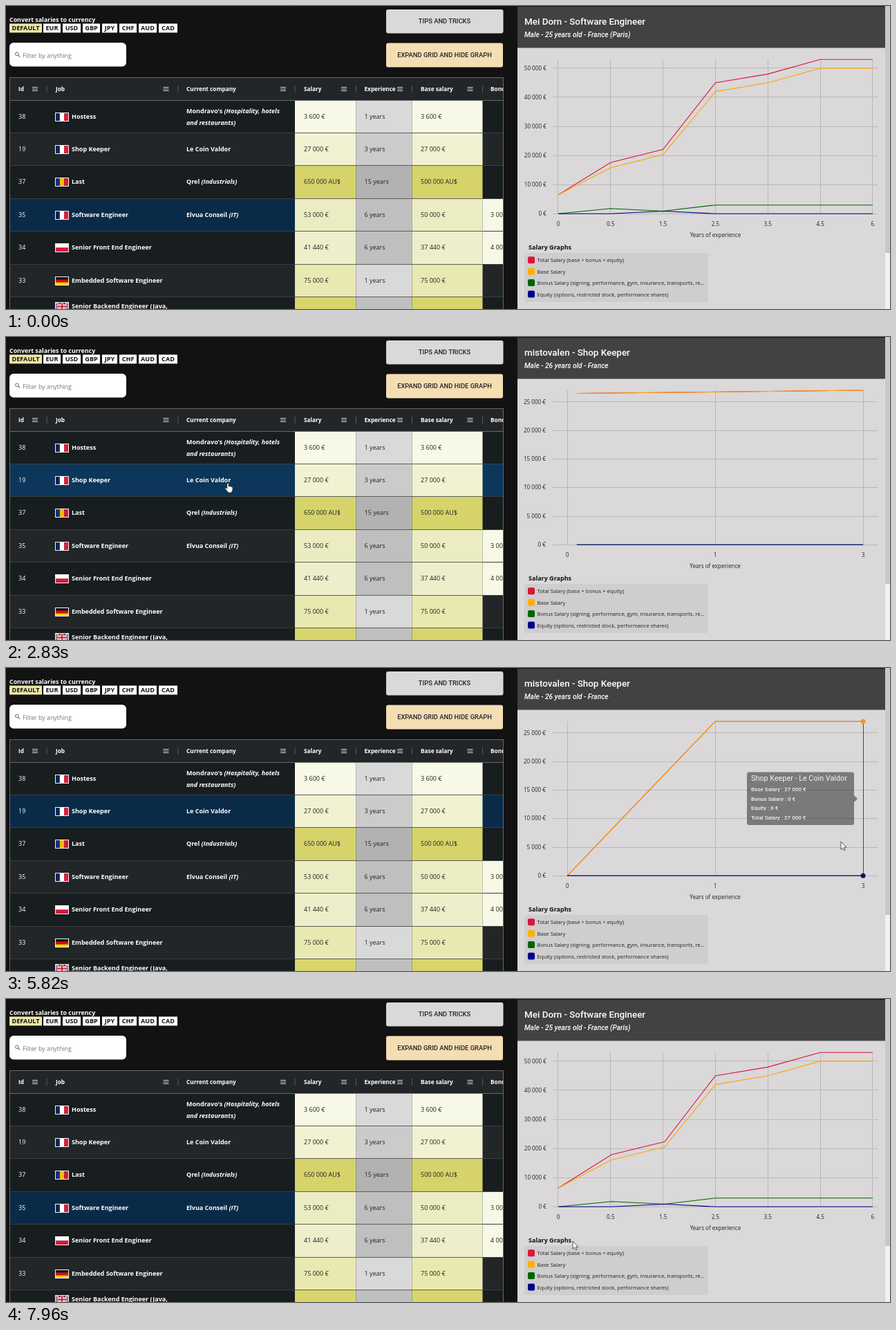
Animation, 1279 px wide and 438 px high, one loop 7.99 s. Source, as an HTML page:

```html
<!DOCTYPE html>
<html lang="en">
<head>
<meta charset="utf-8">
<title>Salary grid</title>
<style>
html, body { margin: 0; width: 100%; height: 100%; overflow: hidden; background: #121212; }
svg { display: block; width: 100vw; height: 100vh; }
text { font: 9px "Open Sans", "Noto Sans", sans-serif; fill: #222; white-space: pre; }
.bold { font-weight: 700; }
.light { fill: #fff; }
.head { font-size: 8.25px; font-weight: 700; fill: #fff; }
.axis { font-size: 8.1px; }
.legend { font-size: 7.67px; }
.button { font: 500 9.4px Roboto, sans-serif; }
.title { font: 500 13.4px Roboto, sans-serif; fill: #fff; }
.sub { font: italic 500 10.15px Roboto, sans-serif; fill: #fff; }
.tip { font: 500 8px Roboto, sans-serif; fill: #f4f4f4; }
.tipTitle { font: 400 10.8px Roboto, sans-serif; fill: #f4f4f4; }
</style>
</head>
<body>
<svg id="stage" viewBox="0 0 1279 438" xmlns="http://www.w3.org/2000/svg"></svg>
<script>
const LOOP = 7990, MORPH = 750;
const ROW_TOP = 136, ROW_H = 47.4, BASE_Y = 300.3, PLOT_H = 223, PLOT_RIGHT = 1261.5;
const COLORS = ['#dc143c', '#ffa500', '#006400', '#00008b'];
const SHOP = 'Le Coin Valdor';

const rect = (x, y, w, h, fill, extra = '') =>
  `<rect x="${x}" y="${y}" width="${w}" height="${h}" fill="${fill}" ${extra}/>`;
const text = (x, y, str, cls = '', extra = '') =>
  `<text x="${x}" y="${y}" class="${cls}" ${extra}>${str}</text>`;
const path = (d, stroke, width = 1, extra = '') =>
  `<path d="${d}" fill="none" stroke="${stroke}" stroke-width="${width}" ${extra}/>`;
const MIDDLE = 'text-anchor="middle"', END = 'text-anchor="end"';
const italic = str => `<tspan font-style="italic">${str}</tspan>`;
const crisp = v => Math.floor(v) + 0.5;

const rows = [
  { id: 38, flag: 'fr', job: 'Hostess', firm: ['Mondravo\'s ' + italic('(Hospitality, hotels'), italic('and restaurants)')],
    pay: '3 600 €', years: 1, base: '3 600 €', fill: '#f7f8e6', grey: '#d9d9d9' },
  { id: 19, flag: 'fr', job: 'Shop Keeper', firm: [SHOP],
    pay: '27 000 €', years: 3, base: '27 000 €', fill: '#f2f1d2', grey: '#cbcbcb' },
  { id: 37, flag: 'ro', job: 'Last', firm: ['Qrel ' + italic('(Industrials)')],
    pay: '650 000 AU$', years: 15, base: '500 000 AU$', fill: '#d5d36a', grey: '#b2b2b2' },
  { id: 35, flag: 'fr', job: 'Software Engineer', firm: ['Elvua Conseil ' + italic('(IT)')],
    pay: '53 000 €', years: 6, base: '50 000 €', bonus: '3 000 €', fill: '#ececc2', grey: '#bfbfbf' },
  { id: 34, flag: 'pl', job: 'Senior Front End Engineer', firm: [],
    pay: '41 440 €', years: 6, base: '37 440 €', bonus: '4 000 €', fill: '#efeecb', grey: '#bfbfbf' },
  { id: 33, flag: 'de', job: 'Embedded Software Engineer', firm: [],
    pay: '75 000 €', years: 1, base: '75 000 €', fill: '#e8e8b1', grey: '#d9d9d9' },
  { flag: 'uk', job: 'Senior Backend Engineer (Java,', firm: [], fill: '#d7d56c', grey: '#bfbfbf', tall: true }
];
const rowY = i => Math.floor(ROW_TOP + ROW_H * i);

const charts = {
  engineer: {
    row: 3, title: 'Mei Dorn - Software Engineer', sub: 'Male - 25 years old - France (Paris)',
    max: 53000, tick: 10000, left: 791.4, ticks: [0, 0.5, 1.5, 2.5, 3.5, 4.5, 6],
    series: [[6500, 17600, 22100, 45000, 48000, 53000, 53000], [6500, 15800, 20300, 42000, 45000, 50000, 50000],
      [0, 1800, 900, 3000, 3000, 3000, 3000], [0, 0, 900, 0, 0, 0, 0]]
  },
  hostess: {
    row: 0, title: 'Velra - Hostess', sub: 'Female - 21 years old - France (Paris) - Bachelor\'s Degree',
    max: 3600, tick: 500, left: 786.4, ticks: [0, 1],
    series: [[3600, 3600], [3600, 3600], [0, 0], [0, 0]]
  },
  shop: {
    row: 1, title: 'mistovalen - Shop Keeper', sub: 'Male - 26 years old - France',
    max: 27000, tick: 5000, left: 790.6, ticks: [0, 1, 3],
    series: [[0, 27000, 27000], [0, 27000, 27000], [0, 0, 0], [0, 0, 0]]
  }
};
const schedule = [[-MORPH, charts.engineer], [1535, charts.hostess], [2806, charts.shop], [7300, charts.engineer]];

// time, x, y of the pointer tip
const pointerPath = [
  [320, 412, -12.3], [640, 305, 90], [780, 266, 135], [930, 324, 174], [2360, 324, 174], [2620, 321, 211],
  [3180, 321, 211], [3480, 592, 235], [3780, 785, 256], [3980, 785, 256], [4180, 832.5, 262],
  [4420, 905, 264], [4580, 905, 264], [5110, 1000, 262], [5370, 1000, 262], [5820, 1208, 251],
  [6060, 1216, 250], [6460, 1216, 250], [6810, 453, 298], [7400, 453, 298], [7900, 820, 350]
];
// start time, active point, left edge of the tooltip
const tips = [[4060, 0, 828], [4640, 1, 1042], [5620, 2, 1072]], TIP_END = 6560;

const lerp = (a, b, k) => a + (b - a) * k;
const clamp = k => Math.max(0, Math.min(1, k));
const smooth = k => k * k * (3 - 2 * k);
const grouped = n => String(n).replace(/\B(?=(\d{3})+$)/g, ' ');

// cubic-bezier(.25, .1, .25, 1)
function ease(x) {
  x = clamp(x);
  let lo = 0, hi = 1;
  const curve = (s, a, b) => 3 * s * (1 - s) ** 2 * a + 3 * s * s * (1 - s) * b + s ** 3;
  for (let i = 0; i < 22; i++) {
    const mid = (lo + hi) / 2;
    if (curve(mid, 0.25, 0.25) < x) lo = mid; else hi = mid;
  }
  return curve(lo, 0.1, 1);
}

function pointX(chart, i) {
  const step = (PLOT_RIGHT - chart.left) / (chart.ticks.length - 0.8);
  return chart.left + step * (0.1 + i);
}
const valueY = (chart, v) => BASE_Y - PLOT_H * v / chart.max;

function flag(kind, y) {
  const x = 71.5, w = 19, h = 12;
  const bands = {
    fr: ['#0a2458', '#fff', '#dc1f38'], ro: ['#10307c', '#fbb800', '#d01c30'],
    pl: ['#fff', '#dc143c'], de: ['#111', '#dd0a0a', '#ffce00']
  }[kind];
  let out = '';
  if (kind === 'uk') {
    const cross = `M${x + w / 2} ${y}v${h}M${x} ${y + 6}h${w}`, diag = `M${x} ${y}l${w} ${h}M${x + w} ${y}l${-w} ${h}`;
    out = rect(x, y, w, h, '#1b2c6b') + path(diag, '#fff', 2.6) + path(diag, '#d01c30', 0.9) +
      path(cross, '#fff', 4) + path(cross, '#d01c30', 2.2);
  } else {
    const n = bands.length, upright = kind === 'fr' || kind === 'ro';
    bands.forEach((c, i) => {
      out += upright ? rect(x + i * w / n, y, w / n, h, c) : rect(x, y + i * h / n, w, h / n, c);
    });
  }
  return out + rect(x, y, w, h, 'none', 'stroke="#f4f4f4"');
}

function toolbar() {
  const chips = [['DEFAULT', 5, 47], ['EUR', 54, 25], ['USD', 82, 26], ['GBP', 111, 25],
    ['JPY', 139, 22], ['CHF', 164, 25], ['AUD', 192, 26], ['CAD', 221, 27]];
  return text(5, 23, 'Convert salaries to currency', 'bold light', 'style="font-size:8.85px"') +
    chips.map(([label, x, w], i) => rect(x, 25.5, w, 13, i ? '#fff' : '#ede7a9') +
      text(x + w / 2, 35.3, label, 'bold', MIDDLE + ' style="fill:#111;font-size:9.1px"')).join('') +
    rect(5, 53, 169, 34.5, '#fff', 'rx="6"') +
    '<circle cx="15.8" cy="69.3" r="2.3" fill="none" stroke="#666"/>' + path('M17.6 71.1l2.6 2.6', '#666', 1.2) +
    text(24, 74.6, 'Filter by anything', '', 'style="fill:#757575;font-size:8.85px"') +
    rect(550, 5, 169.5, 34.5, '#d9d9d9', 'rx="3"') + text(634.5, 25, 'TIPS AND TRICKS', 'button', MIDDLE) +
    rect(550, 53.5, 169, 35, '#f5deb3', 'rx="3"') + text(634.5, 74, 'EXPAND GRID AND HIDE GRAPH', 'button', MIDDLE);
}

function gridHeader() {
  const labels = [['Id', 18], ['Job', 72], ['Current company', 261], ['Salary', 431],
    ['Experience', 518.5], ['Base salary', 600], ['Bonus', 701]];
  return rect(5, 103, 715, 33, '#222628') +
    labels.map(([s, x]) => text(x, 123, s, 'head')).join('') +
    [42, 231.5, 401, 489, 570, 671.5].map(x => path(`M${x - 4} 117.5h8m-8 2.5h8m-8 2.5h8`, '#e8e8e8', 0.9)).join('') +
    [59, 249, 418, 506.5, 587.5, 689.5].map(x => path(`M${x} 115v10`, '#565b5e')).join('');
}

function gridCells() {
  return rows.map((r, i) => {
    const y = rowY(i), mid = y + 27.4, h = rowY(i + 1) - y, line = y + 0.5;
    let out = rect(418, y, 88.5, h, r.fill) + rect(506.5, y, 81, h, r.grey) + rect(587.5, y, 102, h, r.fill);
    if (r.bonus) out += rect(689.5, y, 40, h, '#f7f8e6') + text(701, mid, r.bonus);
    if (i) out += path(`M5 ${line}H418M689.5 ${line}H720`, '#3a3f41') + path(`M418 ${line}H689.5`, '#5c5e58');
    out += flag(r.flag, r.tall ? y + 8.5 : y + 18.5) + text(95, r.tall ? y + 16.6 : mid, r.job, 'bold light');
    if (r.tall) return out;
    const firmY = r.firm.length > 1 ? y + 19.3 : mid;
    return out + text(18, mid, r.id, 'light') +
      r.firm.map((s, k) => text(261, firmY + 16.7 * k, s, 'bold light')).join('') +
      text(431, mid, r.pay) + text(518.5, mid, r.years + ' years') + text(600, mid, r.base);
  }).join('');
}

function panel() {
  const legend = ['Total Salary (base + bonus + equity)', 'Base Salary',
    'Bonus Salary (signing, performance, gym, insurance, transports, re...',
    'Equity (options, restricted stock, performance shares)'];
  const swatches = ['#dc143c', '#ffb000', '#006400', '#00008b'];
  return rect(740, 1, 532, 437, '#dad8d9') + rect(740, 1, 532, 59.5, '#434241') +
    rect(1272, 0, 7, 438, '#f1f1f1') + rect(1272, 0, 7, 357, '#c8c8c8') +
    text(756, 351.5, 'Salary Graphs', 'bold', 'style="fill:#111"') + rect(750, 357, 266, 71, '#cfcdce', 'rx="3"') +
    legend.map((s, i) => rect(755, 362.3 + 16.4 * i, 10, 10, swatches[i], 'rx="2"') +
      text(768.5, 370.3 + 16.4 * i, s, 'legend')).join('');
}

function axes(chart) {
  let out = text(750, 26.5, chart.title, 'title') + text(750, 44.5, chart.sub, 'sub');
  for (let v = 0; v <= chart.max; v += chart.tick) {
    const y = valueY(chart, v);
    out += path(`M${chart.left} ${crisp(y)}H${PLOT_RIGHT}`, '#b9b7b8') +
      text(chart.left - 9.5, y + 2.7, grouped(v) + ' €', 'axis', END);
  }
  chart.ticks.forEach((label, i) => {
    const x = pointX(chart, i);
    out += path(`M${crisp(x)} 77V300`, '#b9b7b8') + text(x, 317.5, label, 'axis', MIDDLE);
  });
  return out + text((chart.left + PLOT_RIGHT) / 2, 334, 'Years of experience', 'axis', MIDDLE);
}

function lines(chart, before, k) {
  return chart.series.map((values, s) => {
    const d = values.map((v, i) => {
      const x = pointX(chart, i), y = valueY(chart, v);
      const old = before?.series[s][i];
      if (old === undefined) return `${x} ${y}`;
      return `${lerp(pointX(before, i), x, k)} ${lerp(valueY(before, old), y, k)}`;
    }).join('L');
    return path('M' + d, COLORS[s], 1.1);
  }).join('');
}

function tooltip(t) {
  if (t < tips[0][0] || t >= TIP_END) return '';
  const n = tips.filter(tip => tip[0] <= t).length - 1;
  const [start, i, goal] = tips[n];
  const left = n ? lerp(tips[n - 1][2], goal, ease((t - start) / 200)) : goal;
  const shown = clamp((t - tips[0][0]) / 220) * clamp((TIP_END - t) / 60);
  const chart = charts.shop, x = pointX(chart, i), value = chart.series[0][i];
  const top = i ? 150.5 : 161, width = i ? 155 : 70, height = i ? 76.5 : 55.5, first = i ? 178 : 170;
  const unit = i ? ' €' : '';
  const edge = i === 2 ? left + width : left, nose = i === 2 ? 5 : -5;
  let out = path(`M${crisp(x)} 77V300`, '#4a4a3c', 1, `opacity="${shown}"`);
  if (i) out += `<circle cx="${x}" cy="${valueY(chart, value)}" r="3.5" fill="#f39a1e"/>`;
  out += `<circle cx="${x}" cy="${BASE_Y}" r="3.5" fill="#14145c"/>`;
  out += `<g opacity="${shown}"><g fill="#000" opacity=".43">` +
    rect(left, top, width, height, '#000', 'rx="3"') + `<path d="M${edge} 184l${nose} 5l${-nose} 5z"/></g>`;
  if (i) out += text(left + 6, 163, 'Shop Keeper - ' + SHOP, 'tipTitle');
  [['Base Salary', value], ['Bonus Salary', 0], ['Equity', 0], ['Total Salary', value]].forEach(([name, v], k) => {
    out += text(left + 6, first + 13.55 * k, `${name} : ${grouped(v)}${unit}`, 'tip');
  });
  return out + '</g>';
}

function pointerAt(t) {
  const next = pointerPath.findIndex(p => p[0] > t);
  if (next === 0) return pointerPath[0].slice(1);
  if (next < 0) return pointerPath[pointerPath.length - 1].slice(1);
  const [t0, x0, y0] = pointerPath[next - 1], [t1, x1, y1] = pointerPath[next];
  const k = smooth((t - t0) / (t1 - t0));
  return [lerp(x0, x1, k), lerp(y0, y1, k)];
}

const ARROW = 'M0 0V11.3L2.6 8.9L4.4 12.8L6.2 12L4.5 8.2H8Z';
const HAND = 'M-1.2 1Q0 -.6 1.2 1V5Q2.4 4 3.3 5.2Q4.6 4.5 5.3 5.7Q7 5.2 7 7V9.6Q6.6 11.6 5.6 12.4V14H-.2V12.6L-4 8.4Q-4.4 6.6 -2.6 7L-1.2 8.2Z';

function pointer(x, y, onRow) {
  return `<path transform="translate(${x} ${y})" d="${onRow ? HAND : ARROW}" fill="#fff" stroke="#222" stroke-width=".75" stroke-linejoin="round"/>`;
}

function rowBacks(selected, hovered) {
  return rows.map((r, i) => {
    let fill = i % 2 ? '#222628' : '#181d1f';
    if (i === selected) fill = i === hovered ? '#0c365a' : '#0a2b48';
    else if (i === hovered) fill = '#030e17';
    return rect(5, rowY(i), 715, rowY(i + 1) - rowY(i), fill);
  }).join('');
}

const stage = document.getElementById('stage');
stage.innerHTML = `<clipPath id="gridClip">${rect(5, 103, 714.5, 340, '#000')}</clipPath>` +
  rect(0, 0, 1279, 438, '#121212') + toolbar() +
  `<g clip-path="url(#gridClip)"><g id="backs"></g>${gridHeader()}${gridCells()}</g>` +
  path('M5 136.5H719.5', '#68686e') + rect(5.5, 103.5, 714, 345, 'none', 'stroke="#68686e"') +
  panel() + '<g id="axes"></g><g id="plot"></g><g id="top"></g>';

const layers = {};
function put(id, markup) {
  if (layers[id] === markup) return;
  layers[id] = markup;
  document.getElementById(id).innerHTML = markup;
}

function render(t) {
  const n = schedule.filter(([start]) => start <= t).length - 1;
  const [start, chart] = schedule[n], before = n ? schedule[n - 1][1] : null;
  const [x, y] = pointerAt(t);
  const onRow = x < 719 && y > ROW_TOP;
  const hovered = onRow && t >= 1260 ? Math.floor((y - ROW_TOP) / ROW_H) : -1;
  put('backs', rowBacks(chart.row, hovered));
  put('axes', axes(chart));
  put('plot', lines(chart, before, ease((t - start) / MORPH)));
  put('top', tooltip(t) + pointer(x, y, onRow));
}

const begin = performance.now();
function tick() {
  render((performance.now() - begin) % LOOP);
  requestAnimationFrame(tick);
}
tick();
</script>
</body>
</html>
```
